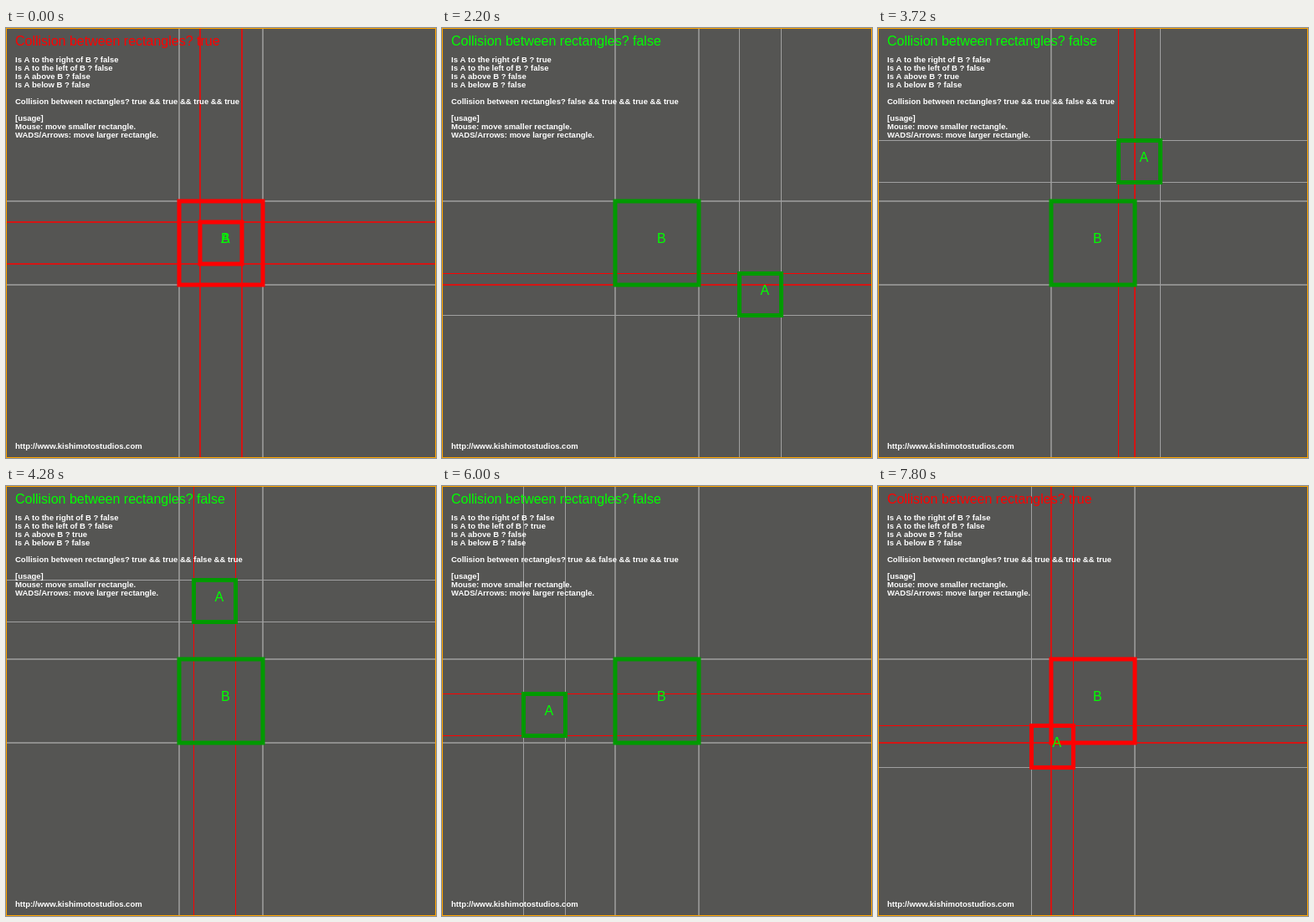
Write an HTML page with a canvas that moves like this. It is 514 px wide and 514 px high and loops after 8000 ms.

```html
<!DOCTYPE html>
<html lang="en">
<head>
<meta charset="utf-8">
<title>Rectangle collision</title>
<style>
html, body { margin: 0; width: 100%; height: 100%; overflow: hidden; background: #555553; }
canvas { display: block; }
</style>
</head>
<body>
<canvas id="stage" width="514" height="514"></canvas>
<script>
const ctx = document.getElementById('stage').getContext('2d');
const LOOP = 8000, STEP = 40, SIZE = 514, CENTER = 257;
const B = { x: 207, y: 207, size: 100, name: 'B' };

// A circles B: each move has a start, an end, and the angle and distance it reaches
const moves = [
  [720, 960, 80, 167],
  [1240, 1360, 73.6, 169.9],
  [1360, 3080, -23.3, 103.5],
  [3080, 4280, -93.8, 120.3],
  [4280, 5120, -154.2, 142.2],
  [5440, 6720, -228.5, 128.2],
  [6720, 7800, -227.8, 72.9]
];

function rectA(t) {
  let angle = moves[0][2], radius = 0;
  for (const [start, end, toAngle, toRadius] of moves) {
    const u = Math.min(1, Math.max(0, (t - start) / (end - start)));
    angle += (toAngle - angle) * u;
    radius += (toRadius - radius) * u;
  }
  const a = angle * Math.PI / 180, size = 50;
  const corner = CENTER - size / 2 + (radius ? .5 : 0);
  return {
    x: corner + Math.round(radius * Math.cos(a)),
    y: corner + Math.round(radius * Math.sin(a)),
    size, name: 'A'
  };
}

function text(str, x, y, font, color) {
  ctx.font = font + ' "Liberation Sans", Arial, sans-serif';
  ctx.fillStyle = color;
  ctx.fillText(str, x, y);
}

const note = (str, y) => text(str, 11, y, 'bold 9.5px', '#ffffff');

// Lines through the sides of rect, red where they cross the other one
function guides(rect, other, red) {
  ctx.strokeStyle = red ? '#ff0000' : '#a0a0a0';
  ctx.lineWidth = 1;
  for (const axis of ['x', 'y']) {
    for (const p of [rect[axis], rect[axis] + rect.size]) {
      const inside = p >= other[axis] && p <= other[axis] + other.size;
      if (inside !== red) continue;
      ctx.beginPath();
      ctx.moveTo(axis === 'x' ? p : 0, axis === 'x' ? 0 : p);
      ctx.lineTo(axis === 'x' ? p : SIZE, axis === 'x' ? SIZE : p);
      // Two passes deepen the antialiased lines
      ctx.stroke();
      ctx.stroke();
    }
  }
}

function draw(t) {
  const A = rectA(t);
  const checks = [
    ['to the right of', A.x > B.x + B.size],
    ['to the left of', A.x + A.size < B.x],
    ['above', A.y + A.size < B.y],
    ['below', A.y > B.y + B.size]
  ];
  const hit = checks.every(check => !check[1]);

  ctx.fillStyle = '#555553';
  ctx.fillRect(0, 0, SIZE, SIZE);
  for (const red of [false, true]) {
    guides(B, A, red);
    guides(A, B, red);
  }

  ctx.strokeStyle = hit ? '#ff0000' : '#009a00';
  ctx.lineWidth = 5;
  for (const r of [B, A]) ctx.strokeRect(r.x, r.y, r.size, r.size);
  for (const r of [B, A]) text(r.name, r.x + r.size / 2, r.y + r.size / 2, '16px', '#00ff00');

  text('Collision between rectangles? ' + hit, 11, 21, '16px', hit ? '#ff0000' : '#00ff00');
  const lines = [
    ...checks.map(([where, is]) => `Is A ${where} B ? ${is}`),
    '',
    'Collision between rectangles? ' + checks.map(check => !check[1]).join(' && '),
    '',
    '[usage]',
    'Mouse: move smaller rectangle.',
    'WADS/Arrows: move larger rectangle.'
  ];
  lines.forEach((line, i) => note(line, 41 + i * 10));
  note('http://www.kishimotostudios.com', 503);

  ctx.strokeStyle = '#ffa500';
  ctx.lineWidth = 1;
  ctx.strokeRect(.5, .5, SIZE - 1, SIZE - 1);
}

const start = performance.now();
function tick() {
  const t = (performance.now() - start) % LOOP;
  draw(Math.floor(t / STEP) * STEP);
  requestAnimationFrame(tick);
}
tick();
</script>
</body>
</html>
```
